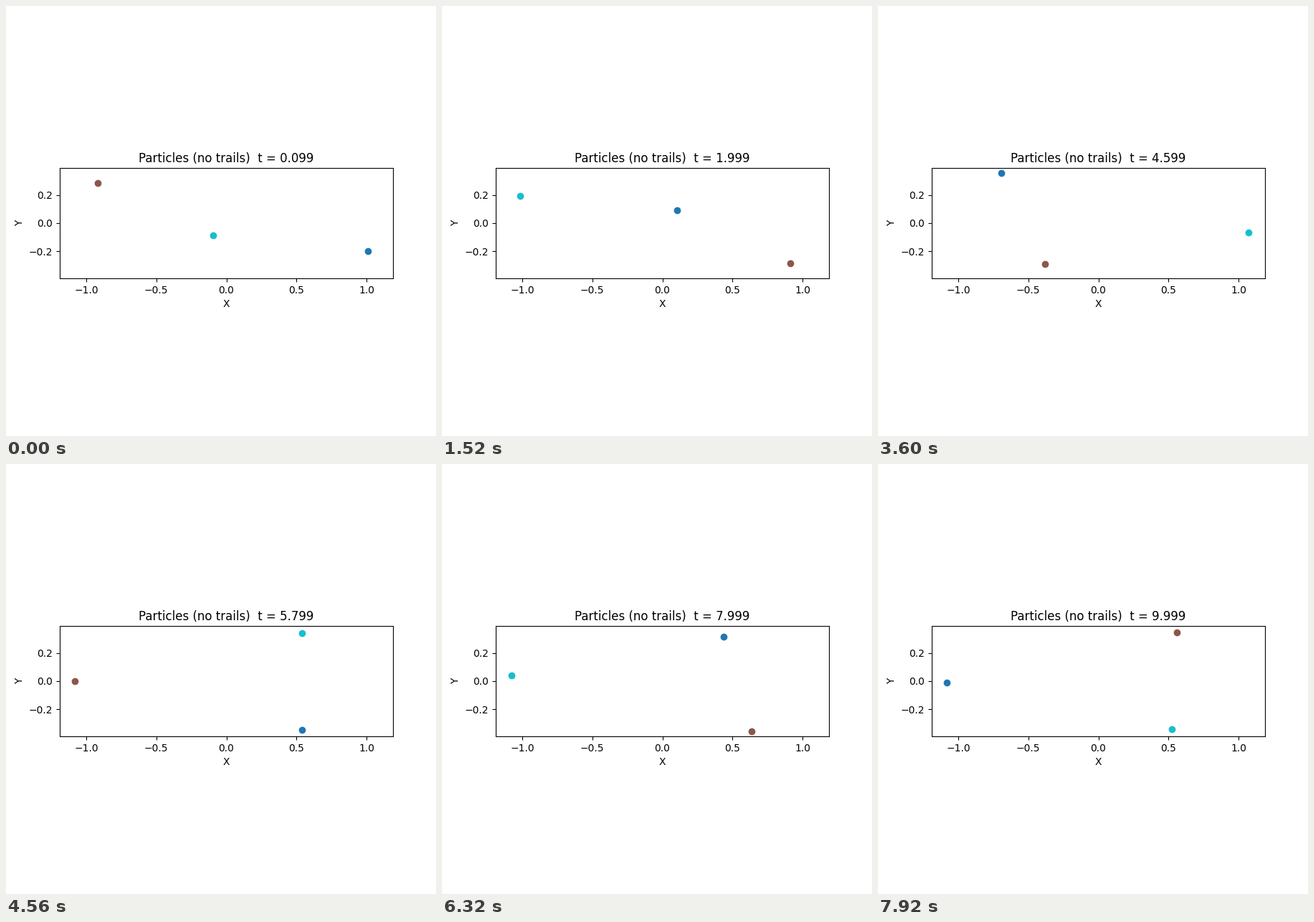
A matplotlib script for the animation above (8000 ms loop, 600 by 600 pixels).

```python
import matplotlib.pyplot as plt
import numpy as np
from matplotlib.animation import FuncAnimation

DT = 0.001
FRAMES = 100
STEPS_PER_FRAME = 100
INTERVAL = 80  # ms


def acceleration(pos):
    """Gravity between equal unit masses."""
    diff = pos[None, :, :] - pos[:, None, :]
    dist2 = (diff ** 2).sum(axis=2) + np.eye(len(pos))
    return (diff / dist2[:, :, None] ** 1.5).sum(axis=1)


def simulate(pos, vel, steps):
    """Leapfrog integration; returns the positions at every step."""
    path = np.empty((steps, *pos.shape))
    acc = acceleration(pos)
    for i in range(steps):
        path[i] = pos
        vel = vel + 0.5 * DT * acc
        pos = pos + DT * vel
        acc = acceleration(pos)
        vel = vel + 0.5 * DT * acc
    return path


# Figure-eight three-body orbit
start = np.array([0.97000436, -0.24308753])
speed = np.array([-0.93240737, -0.86473146])
path = simulate(
    np.array([start, -start, 0 * start]),
    np.array([-speed / 2, -speed / 2, speed]),
    FRAMES * STEPS_PER_FRAME,
)

fig, ax = plt.subplots(figsize=(6, 6), dpi=100)
x_max, y_max = 1.1 * np.abs(path).max(axis=(0, 1))
ax.set_xlim(-x_max, x_max)
ax.set_ylim(-y_max, y_max)
ax.set_aspect("equal")
ax.set_xlabel("X")
ax.set_ylabel("Y")
title = ax.set_title("")

colors = plt.cm.tab10(np.linspace(0, 1, 3))
dots = [ax.plot([], [], "o", color=color, markersize=6)[0] for color in colors]


def update(frame):
    step = (frame + 1) * STEPS_PER_FRAME - 1
    for dot, (x, y) in zip(dots, path[step]):
        dot.set_data([x], [y])
    title.set_text(f"Particles (no trails)  t = {step * DT:.3f}")
    return [*dots, title]


anim = FuncAnimation(fig, update, frames=FRAMES, interval=INTERVAL,
                     repeat=True, repeat_delay=0, blit=False)
plt.show()
```
